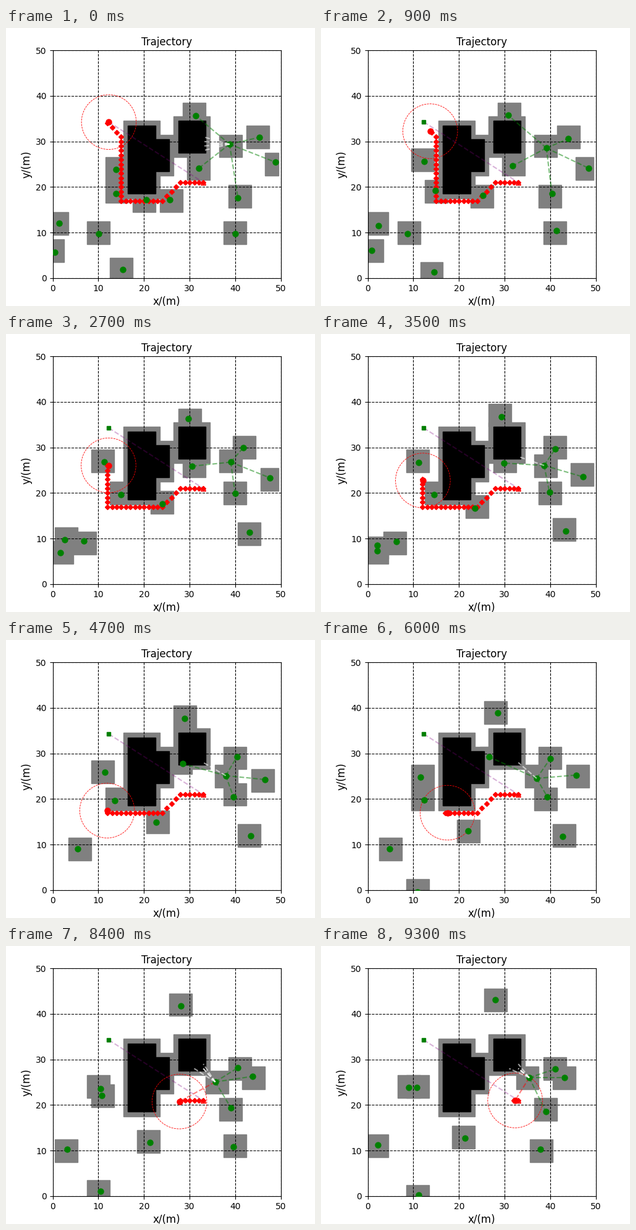
A matplotlib script that plays this animation: 500 by 450 pixels, repeating every 9400 ms.

```python
import math

import numpy as np
import matplotlib.pyplot as plt
from matplotlib.animation import FuncAnimation
from matplotlib.collections import LineCollection
from matplotlib.patches import Circle, Rectangle

STEPS, INTERVAL = 94, 100
LAST = STEPS - 1
START, GOAL = (12.3, 34.25), (33, 21)
SENSE, LINK = 6, 12
PACE = 1.2  # above 1: the robot starts slowly

# Static blocks: x, y, width, height
BLOCKS = [(16.5, 18.5, 6, 15), (22.5, 23.5, 3, 7), (27.5, 27.5, 6, 7)]

# Corners of the robot's drive, and distance driven at each
DRIVE = np.array([START, (14.2, 31.5), (13.4, 28.7), (12.2, 26), (11.9, 17),
                  (24, 17), (28, 21), (32.3, 21)])
DRIVEN = np.r_[0, np.cumsum(np.hypot(*np.diff(DRIVE, axis=0).T))]


class Drift:
    """Smooth curve through evenly timed points; absent outside its time."""

    def __init__(self, *points, begin=0, end=LAST):
        self.begin, self.end = begin, end
        u = np.linspace(0, 1, len(points))
        self.coef = np.polyfit(u, np.array(points), len(points) - 1)

    def at(self, step):
        u = (step - self.begin) / (self.end - self.begin)
        if not 0 <= u <= 1:
            return np.full(2, np.nan)
        return np.polyval(self.coef, u)


observer = Drift((38.75, 29.4), (38.85, 26.4), (36.87, 24.48), (35.4, 26))

movers = [
    Drift((1.4, 12), (2.7, 10.6), (1.6, 7.8), end=39),
    Drift((0.45, 5.7), (2.2, 7.5), end=39),
    Drift((10.1, 9.8), (6.5, 9.4), (4.7, 9.1), (2.2, 11.3)),
    Drift((15.4, 1.9), (13.2, 0.6), end=22),
    Drift((12.2, -2.5), (10.2, 0.9), (11.2, 0.3), begin=50),
    Drift((13.9, 23.8), (11.2, 26.8), (11.6, 24.6), (9, 23.9)),
    Drift((13.9, 18.55), (14.8, 19.7), (12.2, 19.9), (10.7, 23.9)),
    Drift((20.45, 17.2), (20.3, 18.5), end=6),
    Drift((25.7, 17.2), (23.8, 17.2), (21.9, 12.8), (21.3, 12.7)),
    Drift((32, 24.1), (30, 26.4), (25.6, 30), end=66),
    Drift((31.4, 35.6), (28.9, 37.6), (28, 43.1)),
    Drift((45.3, 30.9), (40.4, 29.3), (41.1, 27.9)),
    Drift((48.8, 25.45), (47.4, 23.4), (45.5, 25.4), (43.1, 26)),
    Drift((40.6, 17.55), (39.6, 20.5), (39, 18.6)),
    Drift((40, 9.7), (43.4, 11.9), (37.9, 10.3)),
    observer,
]


def robot_at(step):
    s = DRIVEN[-1] * (step / LAST) ** PACE
    return tuple(np.interp(s, DRIVEN, axis) for axis in DRIVE.T)


def cell(p):
    return round(float(p[0])), round(float(p[1]))


def walk(start, corners):
    """Cells on the way from start through the corners, in king moves."""
    cells = [start]
    for tx, ty in corners:
        while cells[-1] != (tx, ty):
            x, y = cells[-1]
            cells.append((x + int(np.sign(tx - x)), y + int(np.sign(ty - y))))
    return cells


def plan(pos):
    """Down the free column beside the big block, then along to the goal."""
    x, y = cell(pos)
    corners = [c for c in [(24, 17), (28, 21), GOAL] if c[0] > x]
    if x < 16 and y > 17:
        corners.insert(0, (15 if y > 27 else 12, 17))
    return walk((x, y), corners)


def blocked(c):
    return any(x < c[0] < x + w and y < c[1] < y + h for x, y, w, h in BLOCKS)


def ray_hits(pos):
    """First blocked cell along each ray of the observer's range finder."""
    hits = []
    for a in np.radians(range(0, 360, 10)):
        for r in range(1, SENSE + 1):
            c = cell((pos[0] + r * math.cos(a), pos[1] + r * math.sin(a)))
            if blocked(c):
                if math.dist(c, pos) < SENSE:
                    hits.append(c)
                break
    return hits


fig = plt.figure(figsize=(5, 4.5), dpi=100)
ax = fig.add_axes([75.6 / 500, 0.1, 369.2 / 500, 0.82])
ax.set(xlim=(0, 50), ylim=(0, 50))
ax.set_xticks(range(0, 51, 10))
ax.set_yticks(range(0, 51, 10))
ax.grid(color="black", linestyle="--", linewidth=0.8)
ax.set_title("Trajectory", fontsize=12)
ax.set_xlabel("x/(m)", fontsize=12)
ax.set_ylabel("y/(m)", fontsize=12)

for x, y, w, h in BLOCKS:
    ax.add_patch(Rectangle((x - 1, y - 1), w + 2, h + 2, color="gray", zorder=1))
    ax.add_patch(Rectangle((x, y), w, h, color="black", zorder=1.2))

boxes = [ax.add_patch(Rectangle((0, 0), 5, 5, color="gray", zorder=1))
         for _ in movers]

ax.plot(*zip(START, GOAL), "--", color="purple", alpha=0.3, zorder=2)
ax.plot(*START, "gs", ms=4, zorder=2.5)
ax.plot(*GOAL, "r^", mfc="none", ms=6, zorder=2.5)

links = ax.add_collection(LineCollection([], linestyles="--", linewidths=1.5,
                                         alpha=0.5, zorder=2.2))
rays = ax.add_collection(LineCollection([], linestyles="--", linewidths=1.5,
                                        colors="white", alpha=0.6, zorder=3.2))
route, = ax.plot([], [], "rD", ms=3.6, zorder=2.6)
dots, = ax.plot([], [], "go", ms=6.5, zorder=3)
body, = ax.plot([], [], "ro", ms=6.5, zorder=3.5)
ring = ax.add_patch(Circle(START, SENSE, fill=False, ec="red", ls="--",
                           lw=0.6, zorder=2.7))


def draw(step):
    pos, eye = robot_at(step), observer.at(step)
    spots = [m.at(step) for m in movers]

    for box, p in zip(boxes, spots):
        alive = not np.isnan(p[0])
        box.set_visible(alive)
        if alive:
            cx, cy = cell(p)
            x0, x1 = max(cx - 2.5, -0.5), min(cx + 2.5, 49.5)
            box.set_bounds(x0, cy - 2.5, x1 - x0, 5)

    near = [p for p in spots[:-1] if math.dist(p, eye) < LINK]
    segments = [(eye, p) for p in near]
    colors = ["green"] * len(near)
    if math.dist(pos, eye) < LINK:
        segments.append((eye, pos))
        colors.append("red")
    links.set_segments(segments)
    links.set_color(colors)
    rays.set_segments([(eye, c) for c in ray_hits(eye)])

    route.set_data(*zip(*plan(pos)))
    dots.set_data(*zip(*spots))
    body.set_data([pos[0]], [pos[1]])
    ring.center = pos
    return []


anim = FuncAnimation(fig, draw, frames=STEPS, interval=INTERVAL,
                     init_func=lambda: draw(0), repeat=True, repeat_delay=0)
plt.show()
```
